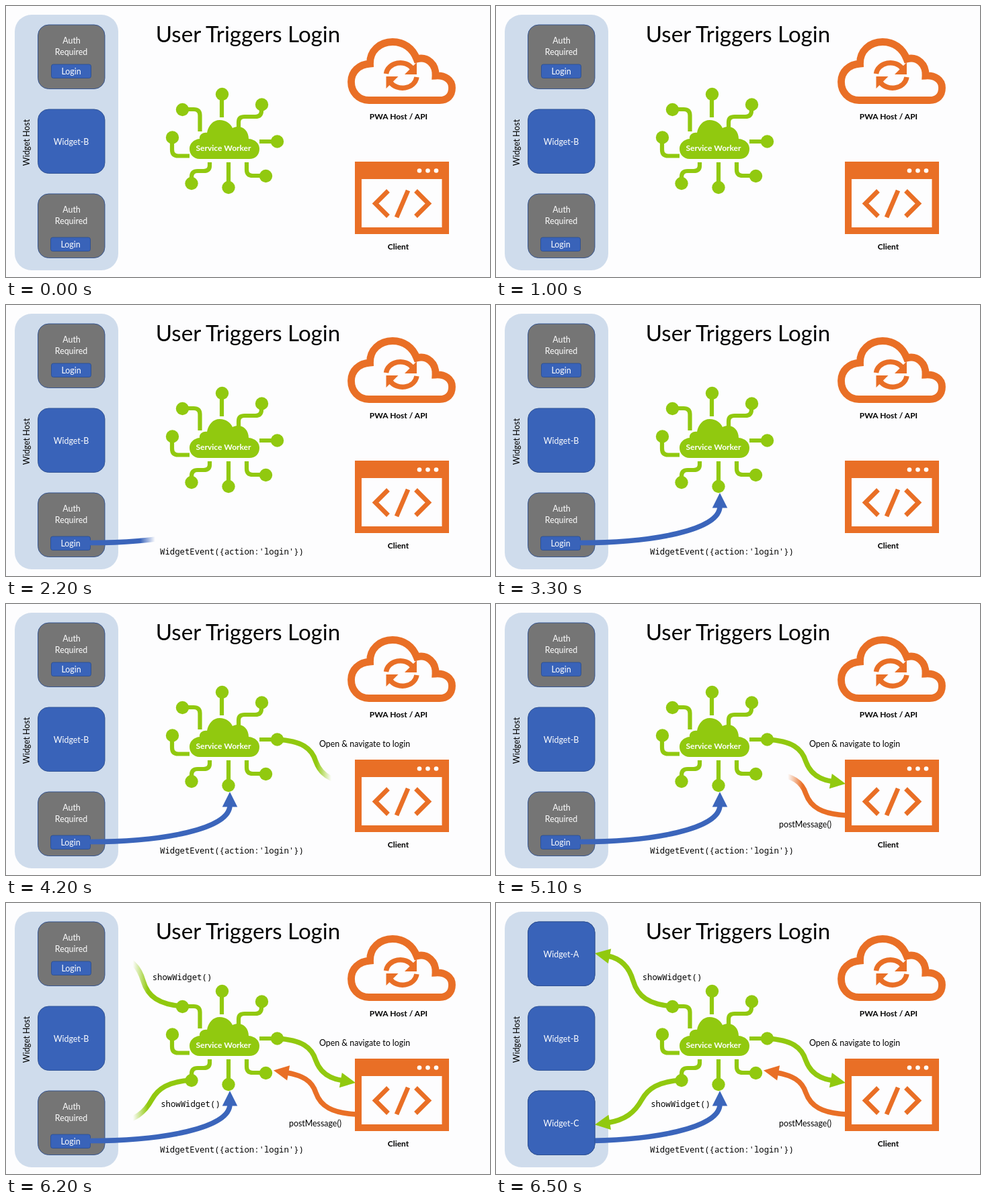
Write an HTML page that moves like this. It is 720x404 px and loops after 8500 ms.

```html
<!DOCTYPE html>
<html lang="en">
<head>
<meta charset="utf-8">
<title>User Triggers Login</title>
<style>
  html, body { margin: 0; width: 100%; height: 100%; overflow: hidden; background: #fdfdfe; }
  svg { display: block; width: 100%; height: 100%; }
  text { font: 12.4px Lato, "Open Sans", sans-serif; text-anchor: middle; }
  .title { font-size: 33.1px; }
  .bold { font-weight: 700; font-size: 12px; }
  .code { font: 500 12.3px "Noto Sans Mono", "DejaVu Sans Mono", monospace; }
  .light { fill: #fff; }

  .blue { --c: #3b65bb; }
  .green { --c: #91c90f; }
  .orange { --c: #e96f26; }
  .fill { fill: var(--c); }
  .line { fill: none; stroke: var(--c); stroke-width: 6.2; }
  .arrow { stroke-width: 7.5; }
  .box { fill: #3963b9; stroke: #2c4f90; stroke-width: .9; }
  .gray { fill: #757575; }

  .show { animation: 8.5s step-end infinite; }
  .wipe { animation: 8.5s steps(5) infinite; }
  .event { animation-name: event; }
  .open { animation-name: open; }
  .post { animation-name: post; }
  .widgets { animation-name: widgets; }
  .done { animation-name: done; }
  .wipe-event { animation-name: wipe-event; }
  .wipe-open { animation-name: wipe-open; }
  .wipe-post { animation-name: wipe-post; }
  .wipe-widgets { animation-name: wipe-widgets; }

  @keyframes event { 0% { opacity: 0 } 22.353%, 100% { opacity: 1 } }
  @keyframes open { 0% { opacity: 0 } 44.706%, 100% { opacity: 1 } }
  @keyframes post { 0% { opacity: 0 } 54.118%, 100% { opacity: 1 } }
  @keyframes widgets { 0% { opacity: 0 } 67.059%, 100% { opacity: 1 } }
  @keyframes done { 0% { opacity: 0 } 76.471%, 100% { opacity: 1 } }
  @keyframes wipe-event {
    0%, 23.529% { transform: translateX(0) } 29.412%, 100% { transform: translateX(242px) }
  }
  @keyframes wipe-open {
    0%, 45.882% { transform: translateX(0) } 51.765%, 100% { transform: translateX(150px) }
  }
  @keyframes wipe-post {
    0%, 56.471% { transform: translateX(0) } 62.353%, 100% { transform: translateX(-145px) }
  }
  @keyframes wipe-widgets {
    0%, 69.412% { transform: translateX(0) } 75.294%, 100% { transform: translateX(-162px) }
  }
</style>
</head>
<body>
<svg viewBox="0 0 720 404">
  <defs>
    <linearGradient id="soft-right">
      <stop offset=".945" stop-color="#fff"/><stop offset="1" stop-color="#fff" stop-opacity="0"/>
    </linearGradient>
    <linearGradient id="soft-left">
      <stop offset="0" stop-color="#fff" stop-opacity="0"/><stop offset=".055" stop-color="#fff"/>
    </linearGradient>
    <mask id="mask-event" maskUnits="userSpaceOnUse" width="720" height="404">
      <rect class="wipe wipe-event" x="-275" width="400" height="404" fill="url(#soft-right)"/>
    </mask>
    <mask id="mask-open" maskUnits="userSpaceOnUse" width="720" height="404">
      <rect class="wipe wipe-open" x="-6" width="400" height="404" fill="url(#soft-right)"/>
    </mask>
    <mask id="mask-post" maskUnits="userSpaceOnUse" width="720" height="404">
      <rect class="wipe wipe-post" x="521" width="400" height="404" fill="url(#soft-left)"/>
    </mask>
    <mask id="mask-widgets" maskUnits="userSpaceOnUse" width="720" height="404">
      <rect class="wipe wipe-widgets" x="286" width="400" height="404" fill="url(#soft-left)"/>
    </mask>
    <path id="head" d="M0 0L-22.500 -11.250V11.250Z"/>
    <rect id="widget" x="47.5" width="99.500" height="95.500" rx="16"/>
    <g id="locked">
      <use href="#widget" class="box gray"/>
      <text class="light" x="97.5" y="28">Auth</text>
      <text class="light" x="97" y="45">Required</text>
    </g>
    <g id="login">
      <rect class="box" width="59" height="20.500" rx="3"/>
      <text class="light" x="29.5" y="14.500">Login</text>
    </g>
  </defs>

  <text class="title" x="360" y="54">User Triggers Login</text>

  <!-- Widget host -->
  <rect x="13" y="13" width="154" height="381" rx="25" fill="#cfdcec"/>
  <text transform="translate(34.5 203.500) rotate(-90)">Widget Host</text>
  <use href="#locked" y="28"/>
  <use href="#login" x="67.5" y="87"/>
  <use href="#widget" class="box" y="154"/>
  <text class="light" x="97" y="206.500">Widget-B</text>
  <use href="#locked" y="280"/>
  <use href="#login" x="66.500" y="345"/>

  <!-- Arrows -->
  <g class="blue" mask="url(#mask-event)">
    <path class="line arrow" d="M125 354.500C232 354.500 333 336 333 300"/>
    <use href="#head" class="fill" transform="translate(333 280) rotate(-90)"/>
  </g>
  <g class="green" mask="url(#mask-open)">
    <path class="line arrow" d="M403 202C440 204 455 215 461 235C468 254 482 262 500 264.500"/>
    <use href="#head" class="fill" transform="translate(520 268) rotate(10)"/>
  </g>
  <g class="orange" mask="url(#mask-post)">
    <path class="line arrow" d="M520 315C485 313 468 303 461 283C455 264 440 257 418 253"/>
    <use href="#head" class="fill" transform="translate(398 249.500) rotate(190)"/>
  </g>
  <g class="green" mask="url(#mask-widgets)">
    <path class="line arrow" d="M262 154C228 151 211 140 204 116C198 95 186 83 167 79"/>
    <use href="#head" class="fill" transform="translate(147 75) rotate(191)"/>
    <path class="line arrow" d="M276 264C241 266 226 277 217 293C206 313 192 323 167 327.500"/>
    <use href="#head" class="fill" transform="translate(147 330.500) rotate(171)"/>
  </g>

  <!-- Service worker -->
  <g class="green">
    <path class="line" d="M321 131V166M262 154H279Q288.500 154 288.500 163V187
      M380 147V156Q380 165 371 165H355Q346 165 346 173V181M247 196V214Q247 223.500 256 223.500H273
      M403 202H377M276 264V255Q276 246 285 246H294Q303 246 303 238V233
      M331 270V233M386 253H367Q358 253 358 244V233"/>
    <path class="fill" d="M288 228C279 228 273 221 273 213C273 205 279 199 288 198C287 193 292 188 299 189
      C301 178 308 170 318 170C327 170 334 175 337 182C349 176 361 184 361 198
      C371 199 377 205 377 213C377 222 371 228 362 228Z"/>
    <g class="fill">
      <circle cx="321.500" cy="131.500" r="9.700"/><circle cx="262.500" cy="154.500" r="9.700"/>
      <circle cx="380.500" cy="147" r="9.700"/><circle cx="247.500" cy="196" r="9.700"/>
      <circle cx="403.500" cy="202" r="9.700"/><circle cx="276" cy="264.500" r="9.700"/>
      <circle cx="331" cy="270.500" r="9.700"/><circle cx="386.500" cy="253.500" r="9.700"/>
    </g>
  </g>
  <text class="bold light" x="323.500" y="215.500">Service Worker</text>

  <!-- Host cloud -->
  <g class="orange">
    <path class="line" style="stroke-width:10.8" d="M540 140.500C524 140.500 513.500 128 513.500 113C513.500 98 525 87 541.500 86
      C541 67 556 53.500 575 53.500C592 53.500 605 63 611 79C627 74.500 640 87 639 104
      C653 103 663.500 110 663.500 122C663.500 134 656 140.500 645 140.500Z"/>
    <path class="line" style="stroke-width:7.5" d="M565.500 101C568 84 594 78 605 94M611 106C608 124 582 128 571 113"/>
    <path class="fill" d="M611 84V102H593ZM565.500 123V105H583.500Z"/>
  </g>
  <text class="bold" x="584" y="169">PWA Host / API</text>

  <!-- Client window -->
  <g class="orange">
    <path class="fill" fill-rule="evenodd" d="M519 232H659V340H519ZM529 258V330H648.500V258Z"/>
    <g fill="#fff">
      <circle cx="615" cy="245.500" r="3.300"/><circle cx="627.500" cy="245.500" r="3.300"/>
      <circle cx="640" cy="245.500" r="3.300"/>
    </g>
    <path class="line" style="stroke-width:6.8" d="M568.500 275.500L549.500 294.500L568.500 313.500M598 275L581 315M609.500 275.500L628.500 294.500L609.500 313.500"/>
  </g>
  <text class="bold" x="583.500" y="363">Client</text>

  <!-- Messages -->
  <text class="show event code" x="336" y="372">WidgetEvent({action:'login'})</text>
  <text class="show open" x="533.500" y="213">Open &amp; navigate to login</text>
  <text class="show post" x="460" y="332.500">postMessage()</text>
  <g class="show widgets">
    <text class="code" x="262" y="115">showWidget()</text>
    <text class="code" x="274.500" y="304">showWidget()</text>
  </g>

  <!-- Unlocked widgets -->
  <g class="show done">
    <use href="#widget" class="box" y="28"/>
    <text class="light" x="97" y="80.500">Widget-A</text>
    <use href="#widget" class="box" y="280"/>
    <text class="light" x="97" y="332.500">Widget-C</text>
  </g>
</svg>
</body>
</html>
```
